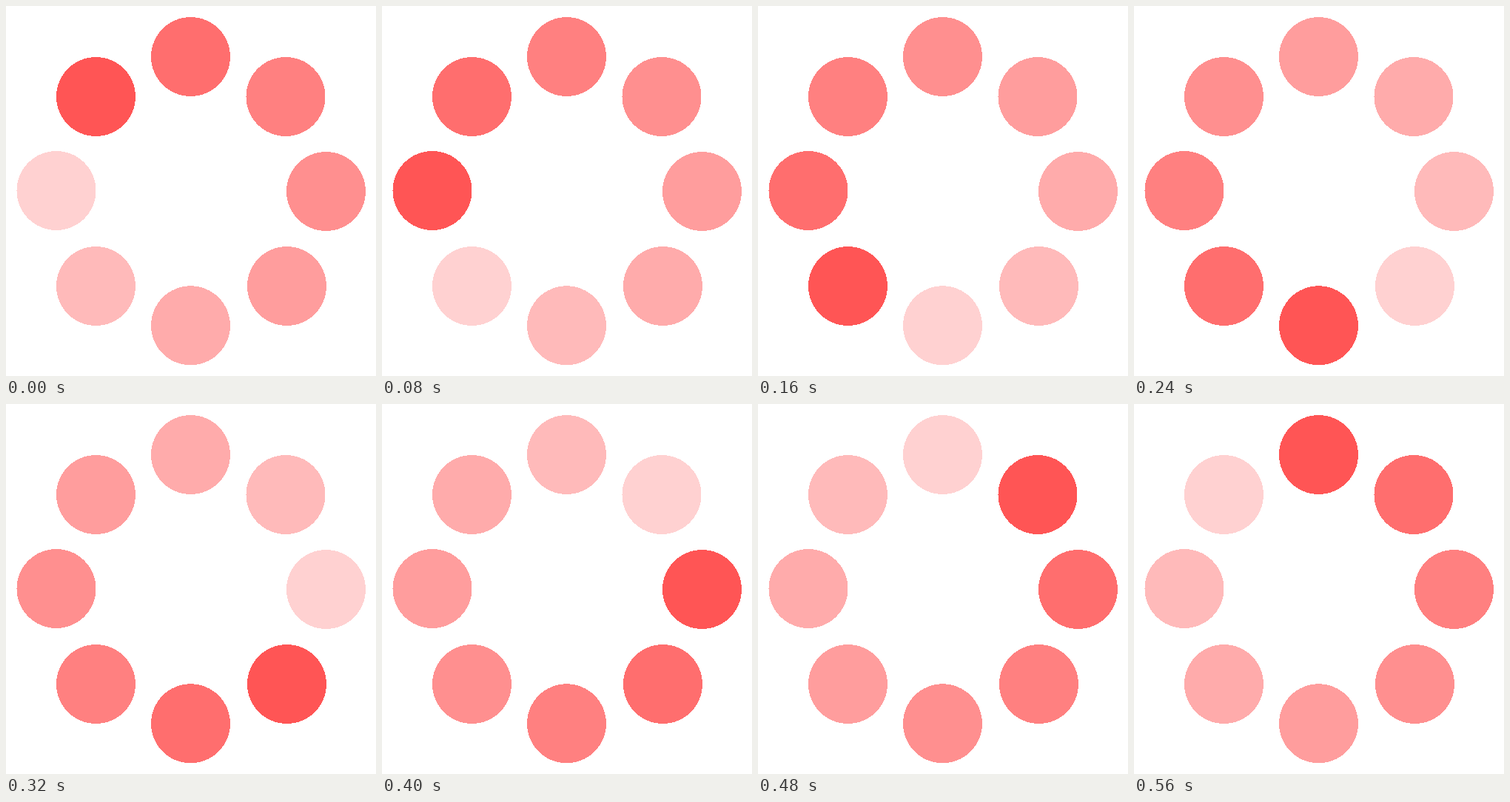
Write an HTML page that moves like this. It is 500 by 500 pixels and loops after 640 ms.

```html
<!DOCTYPE html>
<html lang="en">
<head>
<meta charset="utf-8">
<title>Loading ring</title>
<style>
  html, body { margin: 0; width: 100%; height: 100%; overflow: hidden; background: #fff; }
  svg { display: block; width: 100%; height: 100%; }
  circle {
    r: 53.5px;
    shape-rendering: crispEdges;
    animation: fade 640ms step-end calc(var(--i) * -80ms) infinite;
  }
  @keyframes fade {
    0%    { fill: #ff5555; }
    12.5% { fill: #ff6e6e; }
    25%   { fill: #ff8080; }
    37.5% { fill: #ff8f8f; }
    50%   { fill: #ff9d9d; }
    62.5% { fill: #ffabab; }
    75%   { fill: #ffbaba; }
    87.5% { fill: #ffd1d1; }
    100%  { fill: #ff5555; }
  }
</style>
</head>
<body>
<!-- Dots run clockwise from the top left -->
<svg viewBox="0 0 500 500">
  <circle style="--i:0" cx="121.5" cy="122.5" r="53.5"/>
  <circle style="--i:1" cx="249.5" cy="68.5" r="53.5"/>
  <circle style="--i:2" cx="378" cy="122.5" r="53.5"/>
  <circle style="--i:3" cx="432.5" cy="250.5" r="53.5"/>
  <circle style="--i:4" cx="379.5" cy="378.5" r="53.5"/>
  <circle style="--i:5" cx="249.5" cy="431.8" r="53.5"/>
  <circle style="--i:6" cx="121.5" cy="378.5" r="53.5"/>
  <circle style="--i:7" cx="68" cy="249.5" r="53.5"/>
</svg>
</body>
</html>
```
